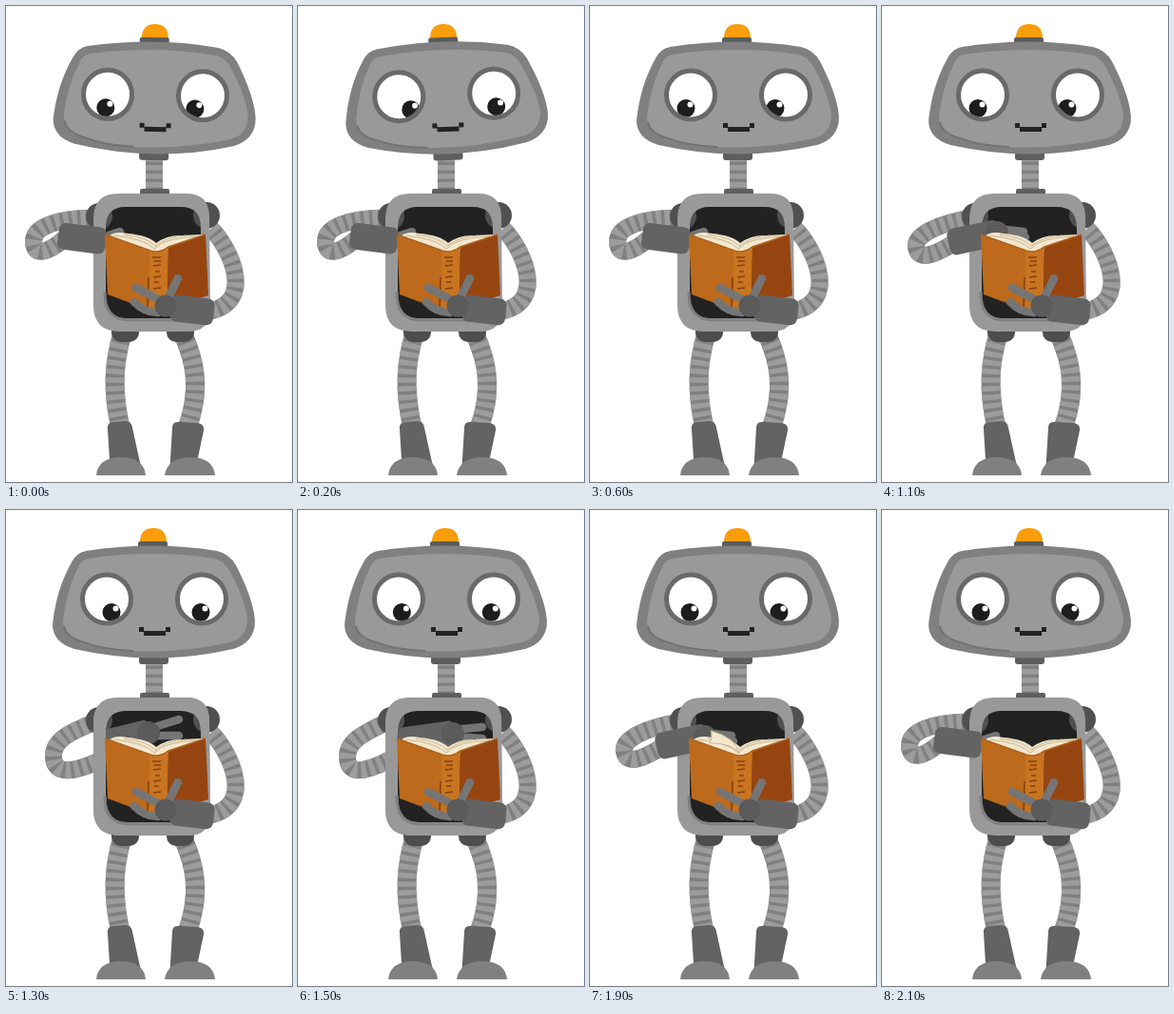
Animation, 301 px wide and 500 px high, one loop 2.2 s. Source, as an HTML page:

```html
<!DOCTYPE html>
<html lang="en">
<head>
<meta charset="utf-8">
<title>Reading robot</title>
<style>
html, body { margin: 0; width: 100%; height: 100%; overflow: hidden; background: #fff; }
svg { display: block; width: 100vw; height: 100vh; }
.tube { fill: none; stroke: #808080; stroke-width: 18; }
.rib { fill: none; stroke: #9c9c9c; stroke-width: 18; stroke-dasharray: 5.5 3.5; }
.finger { fill: none; stroke: #757575; stroke-width: 8.5; stroke-linecap: round; }
.rim { fill: none; stroke: #696969; stroke-width: 5; }
</style>
</head>
<body>
<svg viewBox="0 0 301 500">
  <!-- legs -->
  <g id="legs"></g>
  <path d="M107 445Q106 437 113 437L126 436Q132 436 133 443L144 493H110Z" fill="#636363"/>
  <path d="M175 443Q175 436 182 437L202 438Q209 439 208 446L198 493H172Z" fill="#636363"/>
  <path d="M95 493Q97 474 121 474T147 493ZM167 493Q170 474 194 474T220 493Z" fill="#808080"/>
  <rect x="111" y="328" width="29" height="25" rx="10" fill="#4d4d4d"/>
  <rect x="169" y="328" width="29" height="25" rx="10" fill="#4d4d4d"/>

  <!-- torso -->
  <g id="neck"></g>
  <rect x="141" y="192" width="31" height="10" rx="2" fill="#606060"/>
  <rect x="100" y="205" width="108" height="130" rx="24" fill="#222"/>
  <g id="armTubes"></g>
  <circle cx="98" cy="221" r="14" fill="#505050"/>
  <circle cx="211" cy="220" r="14" fill="#505050"/>
  <g id="frame">
    <path fill="#999" fill-rule="evenodd" d="M118 197H190Q213 197 214 220L215 318Q215 342 191 342H120Q93 342 92 316V222Q93 197 118 197ZM126 211Q105 211 105 233V306Q105 328 128 328H184Q205 328 205 306V233Q205 211 184 211Z"/>
    <path d="M104 300Q103 330 130 330H182" fill="none" stroke="#808080" stroke-width="3"/>
  </g>

  <!-- turning arm -->
  <path id="fingers" class="finger"/>
  <rect id="forearm" y="-14" height="28" rx="7" fill="#636363"/>
  <circle id="palm" r="12" fill="#5b5b5b"/>
  <use id="frontFrame" href="#frame"/>

  <!-- book -->
  <path d="M109 241Q116 236 128 239Q150 241 158 249Q170 240 186 241L206 240L204 245L170 257L154 260Z" fill="#f3e8cf"/>
  <path d="M113 241Q145 244 156 255Q168 243 202 242M124 240Q149 243 157 252Q170 242 190 241" fill="none" stroke="#c9b78f" stroke-width="1"/>
  <path id="page" fill="#f3e8cf" stroke="#cbb88f" stroke-width="1"/>
  <path d="M104 240L152 257L150 319L107 303Z" fill="#bd6a1c"/>
  <path d="M151 257Q161 260 171 252L170 317L150 319Z" fill="#c97420"/>
  <path d="M171 253L210 240L213 304L170 317Z" fill="#974510"/>
  <path d="M104 240L152 257Q162 260 171 253L210 240" fill="none" stroke="#b0621d" stroke-width="1.5"/>
  <path d="M154 264h9M156 268h7M155 273l8 -1M157 279h5M155 285l8 -1M156 290h5M155 297l8 -1M150 285L149 318" fill="none" stroke="#87400f" stroke-width="1.6"/>

  <!-- holding hand -->
  <path class="finger" d="M172 304L181 286M164 310L137 296M160 322Q145 322 135 311"/>
  <rect x="-3" y="-14" width="46" height="28" rx="7" fill="#636363" transform="translate(176 317) rotate(7)"/>
  <circle cx="168" cy="315" r="11.5" fill="#5b5b5b"/>

  <!-- head -->
  <g id="head">
    <rect x="140" y="150" width="31" height="12" rx="3" fill="#5e5e5e"/>
    <path d="M141 35V32Q142 19 155 19T169 32V35Z" fill="#f99d0c"/>
    <rect x="139" y="33" width="31" height="8" rx="2" fill="#5b5b5b"/>
    <path id="skull" fill="#808080" d="M84 43Q155 32 222 43Q235 46 242 58Q261 95 262 117Q262 139 239 146Q156 165 72 146Q49 139 49 120Q53 83 69 55Q74 45 84 43Z"/>
    <path fill="#999" d="M86 51Q155 41 219 51Q229 53 235 63Q253 97 254 116Q253 134 236 139Q180 151 130 148Q94 146 73 137Q60 131 60 117Q63 86 76 60Q79 53 86 51Z"/>
    <path d="M61 122Q63 134 82 139Q103 147 134 148" fill="none" stroke="#737373" stroke-width="2"/>
    <g id="eyes"></g>
    <path d="M140 123h5v5h-5zM168 123h5v5h-5zM145 127h23v5h-23z" fill="#222"/>
  </g>
</svg>
<script>
const $ = id => document.getElementById(id);
const set = (el, attrs) => Object.entries(attrs).forEach(([k, v]) => el.setAttribute(k, v));
const add = (parent, tag, attrs) => {
  const el = document.createElementNS('http://www.w3.org/2000/svg', tag);
  set(el, attrs);
  return $(parent).appendChild(el);
};
const tube = (parent, d = '', width = 18) => ['tube', 'rib'].map(c =>
  add(parent, 'path', { class: c, d, style: `stroke-width:${width}px` }));

tube('legs', 'M122 346C115 370 110 400 121 445', 20);
tube('legs', 'M187 346C197 370 207 400 190 445', 20);
tube('neck', 'M156 158V195');
tube('armTubes', 'M216 234C236 254 264 312 212 321');
const leftTube = tube('armTubes');

const pupils = [106, 206].map(x => {
  add('eyes', 'circle', { cx: x, cy: 93.5, r: 25, fill: '#fff' });
  const g = add('eyes', 'g', {});
  g.innerHTML = '<circle r="9.5" fill="#1d1d1d"/><circle cx="4.5" cy="-4" r="3" fill="#fff"/>';
  add('eyes', 'circle', { cx: x, cy: 93.5, r: 25.5, class: 'rim' });
  return g;
});

// Arm pose: three upper tube points, two lower ones, forearm start, palm, two fingertips
const rest = [62, 222, 29, 230, 29, 247, 44, 259, 61, 245, 55, 241, 102, 247, 120, 237, 118, 240];
const lift = [62, 228, 33, 240, 36, 254, 56, 261, 74, 250, 70, 249, 121, 238, 149, 237, 151, 243];
const over = [66, 234, 49, 242, 50, 260, 70, 276, 97, 264, 104, 245, 150, 234, 182, 220, 182, 237];
const reach = [68, 235, 51, 243, 52, 261, 72, 275, 97, 262, 106, 243, 163, 235, 194, 228, 194, 240];
const pull = [70, 230, 38, 243, 39, 257, 60, 271, 95, 251, 101, 237, 150, 230, 180, 229, 181, 237];
const armKeys = [[1000, rest], [1100, lift], [1300, over], [1500, reach], [1700, pull], [1900, lift], [2100, rest]];

// Left pupil x, right pupil x
const gazeKeys = [[0, [104, 198]], [200, [118, 208]], [300, [117, 207]], [600, [101, 195]],
  [1100, [101, 195]], [1300, [111, 205]], [1400, [111, 205]], [1700, [106, 200]], [2100, [104, 198]]];
// Head tilt, head shift
const headKeys = [[0, [0.8, 1]], [200, [-2, 0.3]], [300, [-2.1, 0.2]], [600, [0, 0]], [2100, [0, 0]]];
const pageKeys = [[1500, [5]], [1600, [25]], [1700, [55]], [1800, [100]], [1900, [140]], [2000, [172]]];

function at(keys, t) {
  const i = keys.findIndex(k => k[0] > t);
  if (i < 0) return keys[keys.length - 1][1];
  if (i === 0) return keys[0][1];
  const [[t0, a], [t1, b]] = [keys[i - 1], keys[i]];
  return a.map((v, n) => v + (b[n] - v) * (t - t0) / (t1 - t0));
}

function drawArm(t) {
  const p = at(armKeys, t);
  const pt = n => p[2 * n] + ' ' + p[2 * n + 1];
  leftTube.forEach(el => set(el, { d: `M93 223C${pt(0)} ${pt(1)} ${pt(2)}S${pt(3)} ${pt(4)}` }));
  const [sx, sy, hx, hy] = p.slice(10, 14);
  const dx = hx - sx, dy = hy - sy;
  set($('forearm'), {
    width: Math.hypot(dx, dy) + 3,
    transform: `translate(${sx} ${sy}) rotate(${Math.atan2(dy, dx) * 180 / Math.PI})`
  });
  const inside = t >= 1300 && t <= 1800;
  set($('palm'), { cx: hx, cy: hy, visibility: t >= 1100 && t < 2000 ? 'visible' : 'hidden' });
  set($('fingers'), { d: `M${hx} ${hy - 4}L${pt(7)}M${hx} ${hy + 3}L${pt(8)}` });
  set($('frontFrame'), { visibility: inside ? 'visible' : 'hidden' });
}

function drawPage(t) {
  const a = at(pageKeys, t)[0] * Math.PI / 180;
  const x = 158 + 40 * Math.cos(a), y = 246 - 22 * Math.sin(a);
  const side = Math.cos(a) * 4;
  set($('page'), {
    d: `M157 256Q${158 + side} 240 ${x} ${y}Q${x - side / 2} ${y + 8} ${x + side / 2} ${y + 13}Q${160 + side * 3} 245 157 256Z`,
    visibility: t >= 1600 && t <= 2000 ? 'visible' : 'hidden'
  });
}

function draw(now) {
  const t = Math.floor(now % 2200 / 100) * 100;
  const [tilt, shift] = at(headKeys, t);
  set($('head'), { transform: `translate(${shift} 0) rotate(${tilt} 155.5 95)` });
  at(gazeKeys, t).forEach((x, i) => set(pupils[i], { transform: `translate(${x} 107.5)` }));
  drawArm(t);
  drawPage(t);
}

let start;
function tick(now) {
  start ??= now;
  draw(now - start);
  requestAnimationFrame(tick);
}
draw(0);
requestAnimationFrame(tick);
</script>
</body>
</html>
```
